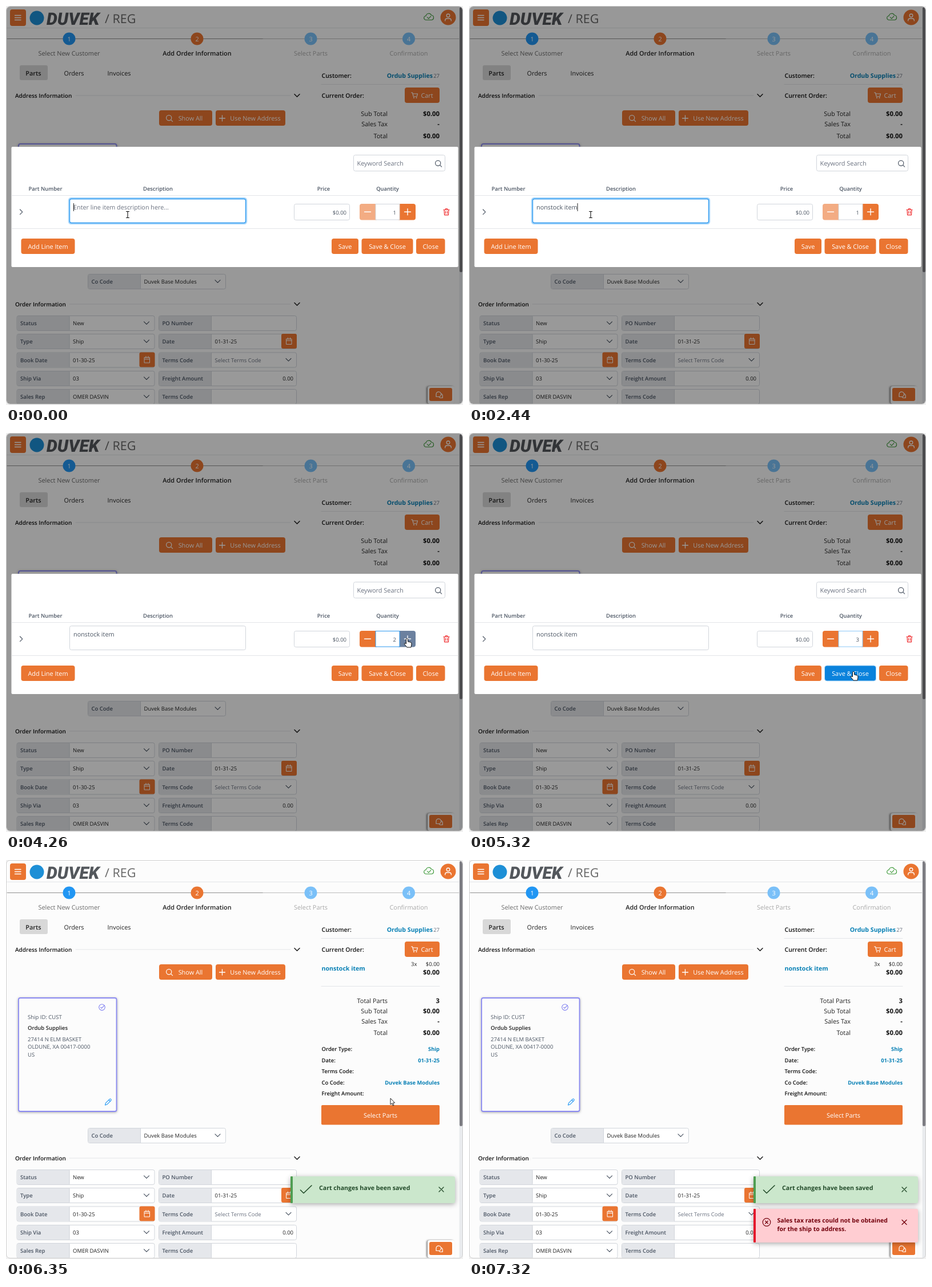
An HTML page for the animation above (8.18 s loop, 800 by 700 pixels).

```html
<!DOCTYPE html>
<html lang="en">
<head>
<meta charset="utf-8">
<title>Order entry</title>
<style>
html, body { margin: 0; width: 100%; height: 100%; overflow: hidden; background: #f1f1f1; }
svg { display: block; width: 800px; height: 700px; }
text { font: 10.9px "Open Sans", sans-serif; fill: #222; white-space: pre; text-rendering: geometricPrecision; }
.s { font-size: 9.5px; }
.b { font-weight: 600; }
.x { font-weight: 700; font-size: 11.3px; fill: #111; }
.m { text-anchor: middle; }
.e { text-anchor: end; }
.w { fill: #fff; }
.k { fill: #111; }
.g { fill: #6b7280; }
.l { fill: #4b5563; }
.n { fill: #6b6b6b; }
.todo { fill: #a9a9a9; }
.link { font-weight: 700; font-size: 10.6px; fill: #0880b5; }
.link.s { font-size: 9.3px; }
.good { font-weight: 700; font-size: 10.6px; fill: #224a29; }
.bad { font-weight: 700; font-size: 10.5px; fill: #73000c; }
.toast { filter: drop-shadow(0 2px 4px #0005); }
.line { fill: none; stroke-linecap: round; stroke-linejoin: round; }
</style>
</head>
<body>
<svg id="stage" viewBox="0 0 800 700"></svg>
<script>
const ORANGE = '#ea7531', SLATE = '#6c819f', BLUE = '#0a82dc', EDGE = '#d1d5db', PAPER = '#fcfcfc';
const LOOP = 8180;

const text = (x, y, str, cls = '', more = '') =>
  `<text x="${x}" y="${y}" class="${cls}" ${more}>${str.replace(/&/g, '&amp;')}</text>`;
const rect = (x, y, w, h, fill, more = '') =>
  `<rect x="${x}" y="${y}" width="${w}" height="${h}" fill="${fill}" ${more}/>`;
const frame = (x, y, w, h, more = '') =>
  rect(x + .5, y + .5, w - 1, h - 1, '#fff', `stroke="${EDGE}" rx="3" ${more}`);
const circle = (x, y, r, fill, more = '') =>
  `<circle cx="${x}" cy="${y}" r="${r}" fill="${fill}" ${more}/>`;
const line = (d, color, width = 1.2, more = '') =>
  `<path class="line" d="${d}" stroke="${color}" stroke-width="${width}" ${more}/>`;
const group = (id, body, more = '') => `<g id="${id}" ${more}>${body}</g>`;
const rule = (x1, x2, y) => line(`M${x1} ${y}H${x2}`, '#e3e5e8', 1);
const down = (x, y, color = '#4b5563', width = 1.2) =>
  line(`M${x - 4.5} ${y - 2.2}l4.5 4.5 4.5-4.5`, color, width);
const lens = (x, y, color) =>
  circle(x - .8, y - .8, 4.6, 'none', `stroke="${color}" stroke-width="1.2"`) +
  line(`M${x + 2.6} ${y + 2.6}l3 3`, color);
const cross = (x, y, color, r = 4) =>
  line(`M${x - r} ${y - r}l${2 * r} ${2 * r}m0 ${-2 * r}l${-2 * r} ${2 * r}`, color, 1.3);
const button = (x, y, w, h, label, { labelX = x + w / 2, id = '', radius = 4 } = {}) =>
  rect(x, y, w, h, ORANGE, `rx="${radius}" ${id && `id="${id}"`}`) +
  text(labelX, y + h / 2 + 4.5, label, 'm w');

const calendar = (x, y) => rect(x, y, 27, 26, ORANGE, 'rx="3"') +
  line(`M${x + 9} ${y + 9}h9v9.5h-9zm0 3h9m-6.5-5v3m4-3v3`, '#fff', 1);

function field(x, y, label, value = '', kind = '', w = 242) {
  const end = x + w;
  let out = frame(x, y, w, 27) +
    rect(x + 1, y + 1, 92, 25, '#e5e7eb', 'rx="2"') +
    line(`M${x + 92.5} ${y + 1}v25`, EDGE, 1) +
    text(x + 6.5, y + 17, label, 's b l');
  out += kind === 'number' ? text(end - 6, y + 17, value, 's e')
                           : text(x + 98.5, y + 17, value, kind === 'hint' ? 's g' : 's');
  if (kind === 'pick' || kind === 'hint') out += down(end - 14.5, y + 13);
  if (kind === 'date') out += calendar(end - 27, y);
  return out;
}

const step = (n, x, label, color, cls) =>
  circle(x, 57.5, 11, color) + text(x, 61.7, String(n), 'm w') + text(x, 87, label, 'm ' + cls);

const section = (label, y, from) =>
  text(16, y, label, 'b k', 'style="font-size:10px"') + rule(from, 498, y - 4) + down(509.5, y - 4, '#222', 1.6);

const header =
  rect(7, 6, 28, 29, ORANGE, 'rx="4"') +
  line('M15.5 16.5h10.5m-10.5 4h10.5m-10.5 4h10.5', '#fff', 1.3) +
  circle(54, 21, 12.5, '#1d8fd6') +
  text(71, 33, 'DUVEK', '', 'style="font:italic 900 30px Roboto,sans-serif;fill:#53575c"') +
  text(173, 30, '/ REG', '', 'style="font-size:21.5px;fill:#666"') +
  line('M736.5 24.5h-1a3.6 3.6 0 0 1-.4-7.2a5 5 0 0 1 9.4-1.3a4.3 4.3 0 0 1 .6 8.5zM737.5 19.8l2.3 2.3 4-4.2', '#3f9a3b') +
  circle(774, 20, 13.5, ORANGE) +
  circle(774, 16.8, 2.8, 'none', 'stroke="#fff" stroke-width="1.3"') +
  line('M768.7 26v-.8q0-3.2 3.2-3.2h4.2q3.2 0 3.2 3.2v.8', '#fff', 1.3) +
  rule(1, 793, 38.5);

const stepper =
  line('M2 57.5H450', '#8f8f8f', 1) +
  line('M450 57.5H793', '#bcbcbc', 1) +
  step(1, 110.5, 'Select New Customer', '#2196f3', 'n') +
  step(2, 334.5, 'Add Order Information', ORANGE, 'b') +
  step(3, 533.5, 'Select Parts', '#7ac0f8', 'todo') +
  step(4, 705, 'Confirmation', '#7ac0f8', 'todo');

const addressCard =
  rect(22, 242, 171.5, 199, PAPER, 'rx="3" stroke="#8b8af2" stroke-width="1.8" style="filter:drop-shadow(0 1px 2px #0005)"') +
  circle(168, 258.3, 5.3, 'none', 'stroke="#7f7ff0" stroke-width="1.1"') +
  line('M165.6 258.4l1.8 1.8 4.5-4.8', '#7f7ff0', 1.1) +
  text(38, 278.5, 'Ship ID: CUST', 's l') +
  text(38, 298, 'Ordub Supplies', 's b') +
  text(38, 317.5, '27414 N ELM BASKET', 's l') +
  text(38, 331, 'OLDUNE, XA 00417-0000', 's l') +
  text(38, 344.5, 'US', 's l') +
  line('M173.5 430l1-3.6 7-7q1.2-.8 2.2.2t.2 2.2l-7 7zM180 421l2.4 2.4', '#2196f3', 1.1);

const workArea =
  rect(24, 104, 49, 26, '#d8d8d8', 'rx="3"') +
  text(48, 121.5, 'Parts', 'b m') + text(119, 121.5, 'Orders', 'm', 'font-weight="500"') +
  text(198, 121.5, 'Invoices', 'm', 'font-weight="500"') +
  section('Address Information', 161, 122) +
  button(268, 183, 93, 27, 'Show All', { labelX: 323 }) + lens(286, 197, '#fff') +
  button(367, 183, 122, 27, 'Use New Address', { labelX: 436.5 }) +
  line('M373.5 197h10m-5-5v10', '#fff', 1.3) +
  addressCard +
  field(143, 470, 'Co Code', 'Duvek Base Modules', 'pick') +
  section('Order Information', 527, 111) +
  field(18.5, 543, 'Status', 'New', 'pick') + field(267, 543, 'PO Number') +
  field(18.5, 575, 'Type', 'Ship', 'pick') + field(267, 575, 'Date', '01-31-25', 'date') +
  field(18.5, 607.5, 'Book Date', '01-30-25', 'date') + field(267, 607.5, 'Terms Code', 'Select Terms Code', 'hint') +
  field(18.5, 640, 'Ship Via', '03', 'pick') + field(267, 640, 'Freight Amount', '0.00', 'number') +
  field(18.5, 672, 'Sales Rep', 'OMER DASVIN', 'pick') + field(267, 672, 'Terms Code');

const totals = rows => rows.map(([label, value, y]) =>
  text(668, y, label, 'e') + text(759, y, value, 'x e')).join('');

const orderHead =
  text(552.5, 125.5, 'Customer:', 'b k', 'style="font-size:10.5px"') +
  text(747, 125.5, 'Ordub Supplies', 'e link') + text(759, 125.5, '27', 's e g') +
  rule(552, 759, 137.5) +
  text(552.5, 161, 'Current Order:', 'b k', 'style="font-size:10.5px"') +
  button(698, 143, 61, 27, 'Cart', { labelX: 737 }) +
  line('M709.5 152h2l1.7 6.8h6l1.3-4.8h-8.3', '#fff', 1.1) +
  circle(714, 161, 1, '#fff') + circle(718.5, 161, 1, '#fff');

const emptyOrder = totals([['Sub Total', '$0.00', 193], ['Sales Tax', '-', 211], ['Total', '$0.00', 232]]);

const details = [['Order Type:', 'Ship'], ['Date:', '01-31-25'], ['Terms Code:', ''],
  ['Co Code:', 'Duvek Base Modules'], ['Freight Amount:', '']];
const filledOrder =
  text(552.5, 194, 'nonstock item', 'link') +
  text(709, 186, '3x', 's') + text(759, 186, '$0.00', 's e') + text(759, 201, '$0.00', 'x e') +
  rule(552, 759, 221.5) +
  totals([['Total Parts', '3', 250.5], ['Sub Total', '$0.00', 269], ['Sales Tax', '-', 287], ['Total', '$0.00', 307]]) +
  details.map(([label, value], i) => text(552.5, 335 + i * 19.5, label, 's b k') +
    text(759, 335 + i * 19.5, value, 's e link')).join('') +
  button(552, 430, 207, 34.5, 'Select Parts', { radius: 2 });

const chat =
  rect(738, 667, 47, 31, '#fff', 'rx="4" style="filter:drop-shadow(-2px 0 1.5px #0007)"') +
  rect(741, 670, 40, 23, ORANGE, 'rx="3"') +
  line('M753 685.5v-4.5a4.3 4.3 0 1 1 4.3 4.5zM762.5 680.5a3.3 3.3 0 0 1 1.7 3v4h-3.5a3.2 3.2 0 0 1-2.7-1.7', '#fff', 1.2);

const scrollbar = rect(793.5, 1, 6, 697, '#e9ebee') + rect(794, 2, 5, 465, '#7c7c82', 'rx="2.5"');

const heading = (x, label) => text(x, 323.5, label, 'b m l', 'style="font-size:9.4px"');
const modal =
  rect(9.5, 247, 782, 211, '#fff', 'rx="2"') +
  frame(608, 261, 161, 29) + text(614.5, 280, 'Keyword Search', 'g') + lens(757, 276.5, '#4b5563') +
  heading(69, 'Part Number') + heading(266, 'Description') + heading(556, 'Price') + heading(668, 'Quantity') +
  rule(10, 791, 332.5) + rule(10, 791, 390.5) +
  line('M24.5 357l4.3 4.3-4.3 4.3', '#4b5563') +
  frame(111, 338, 309, 43) +
  group('focus', rect(110, 337, 311, 45, '#fff', 'rx="4" stroke="#a9d7fb" stroke-width="2.5"') +
    rect(111.5, 338.5, 308, 42, '#fff', 'rx="3" stroke="#2b98ef" stroke-width="1.3"')) +
  text(118, 357, '', '', 'id="desc" style="font-size:10.8px"') +
  rect(0, 346, 1, 14, '#222', 'id="caret"') +
  frame(504, 347, 98, 29) + text(596, 365.5, '$0.00', 's e l') +
  rect(619, 347, 32, 28.5, ORANGE, 'rx="4" id="minus"') +
  rect(685, 347, 32, 28.5, ORANGE, 'rx="4" id="plus"') +
  rect(647, 347.5, 42, 27.5, '#fff', `stroke="${EDGE}" id="qtyBox"`) +
  text(683, 365.5, '1', 's e l', 'id="qty"') +
  line('M627.5 361.3h11m59 0h11m-5.5-5.5v11', '#fff', 1.4) +
  line('M766 357.5h10m-9 0l.6 9.2h6.8l.6-9.2m-5.5 0v-2h3v2m-3 2.5v4m3-4v4', '#ef2b2d') +
  button(26.5, 408, 94, 27, 'Add Line Item') +
  button(570, 408, 47, 27, 'Save') +
  button(622.5, 408, 90, 27, 'Save & Close', { id: 'saveClose' }) +
  button(718, 408, 50.5, 27, 'Close');

const toast = (y, h, fill, bar) =>
  rect(498, y, 288, h, fill, 'rx="3" class="toast"') + rect(498, y, 4, h, bar, 'rx="1"');
const savedToast = toast(555, 47, '#cbe7cc', '#4f9e52') +
  line('M515.5 579l5.5 5.5 14-13.5', '#224a29', 1.6) +
  text(548, 579, 'Cart changes have been saved', 'good') +
  cross(762, 578, '#224a29');
const errorToast = toast(612, 59, '#ffcdd2', '#e4152b') +
  circle(521, 635.5, 6.8, 'none', 'stroke="#73000c" stroke-width="1.2"') + cross(521, 635.5, '#73000c', 2.3) +
  text(539.5, 636, 'Sales tax rates could not be obtained', 'bad') +
  text(539.5, 651, 'for the ship to address.', 'bad') +
  cross(762, 635.5, '#73000c');

const cursorShapes = {
  beam: line('M-2.5-5.5h2l.5.5.5-.5h2M0-5v10M-2.5 5.5h2l.5-.5.5.5h2', '#111', 1.1),
  arrow: '<path d="M0 0V11L2.5 8.8 4.3 13 6 12.2 4.2 8.2 7.6 8Z" fill="#fff" stroke="#222"/>',
  hand: '<path d="M-1.5 1.5Q0-1 1.5 1.5V6L6 7Q8 7.5 8 10L7 16H0L-4.5 10.5Q-5 8-2.5 9L-1.5 10Z" fill="#fff" stroke="#111"/>'
};

document.getElementById('stage').innerHTML =
  '<clipPath id="window"><rect x="1" y="1" width="798" height="697" rx="6"/></clipPath>' +
  group('page', rect(0, 0, 800, 700, PAPER) + header + stepper + workArea + orderHead +
    group('emptyOrder', emptyOrder) + group('filledOrder', filledOrder) + scrollbar +
    group('saved', savedToast) + chat + group('error', errorToast) +
    rect(0, 0, 800, 700, '#000', 'opacity=".4" id="shade"'), 'clip-path="url(#window)"') +
  rect(.5, .5, 799, 698, 'none', 'rx="6.5" stroke="#cfcfcf"') +
  group('modal', modal) +
  group('cursor', Object.entries(cursorShapes).map(([id, shape]) => group(id, shape)).join(''));

const ui = id => document.getElementById(id);
const show = (id, on) => { ui(id).style.display = on ? '' : 'none'; };
const paint = (id, fill) => ui(id).setAttribute('fill', fill);
const place = (id, x, y, opacity = 1) => {
  ui(id).setAttribute('transform', `translate(${x} ${y})`);
  ui(id).setAttribute('opacity', opacity);
};
const within = (t, a, b) => t >= a && t < b;
const current = (table, t) => table.findLast(row => row[0] <= t);

const typing = [[0, ''], [370, 'n'], [510, 'no'], [650, 'non'], [1220, 'nons'], [1350, 'nonsto'],
  [1480, 'nonstoc'], [1610, 'nonstock'], [1890, 'nonstock '], [2170, 'nonstock i'],
  [2310, 'nonstock ite'], [2440, 'nonstock item']];
const pointer = [[0, 213, 366, 'beam'], [3000, 224, 369, 'beam'], [3120, 300, 390, 'arrow'],
  [3240, 440, 424, 'arrow'], [3360, 612, 446, 'arrow'], [3480, 705, 411, 'hand'],
  [3630, 708, 393, 'arrow'], [3750, 705, 372, 'hand'], [3870, 703, 363, 'hand'],
  [3990, 702, 360, 'hand'], [4760, 697, 385, 'arrow'], [4920, 682, 412, 'hand'],
  [5080, 673, 418, 'hand'], [5900, 673, 418, 'arrow'], [6770, 682, 410, 'arrow'],
  [6910, 706, 396, 'arrow'], [7050, 746, 386, 'arrow'], [7180, 786, 384, 'arrow'], [7320, 850, 384, 'arrow']];
const savedMotion = [[0, 0, 0], [5600, 80, .62], [5750, 69, 1], [6350, 0, 1]];
const errorMotion = [[0, 0, 0], [6490, 14, .5], [6630, 0, 1]];

const ruler = document.createElement('canvas').getContext('2d');
ruler.font = '10.8px "Open Sans", sans-serif';

function render(t) {
  const closed = t >= 5600, focused = t < 4110;
  show('shade', !closed);
  show('emptyOrder', !closed);
  show('filledOrder', closed);
  show('modal', t < 5750);
  ui('modal').setAttribute('opacity', closed ? .08 : 1);
  ui('modal').setAttribute('transform', closed ? 'translate(111 95) scale(.725)' : '');

  const typed = current(typing, t)[1];
  ui('desc').textContent = typed || 'Enter line item description here...';
  ui('desc').setAttribute('class', typed ? 'l' : 'g');
  ui('caret').setAttribute('x', 118 + ruler.measureText(typed).width);
  show('caret', focused && !within(t, 3000, 3480) && t < 3990);
  show('focus', focused);

  ui('qty').textContent = t < 4110 ? 1 : t < 4430 ? 2 : 3;
  paint('minus', focused ? '#f3ac83' : ORANGE);
  paint('plus', within(t, 3750, 4760) ? SLATE : ORANGE);
  ui('qtyBox').setAttribute('stroke', focused ? EDGE : t < 5320 ? '#2b98ef' : '#8cc8f7');
  const hovered = within(t, 3480, 3630) || within(t, 4920, 5320);
  paint('saveClose', t >= 5320 ? BLUE : hovered ? SLATE : ORANGE);
  ui('saveClose').setAttribute('stroke', t >= 5320 ? '#b5dbf8' : 'none');

  const [, savedY, savedAlpha] = current(savedMotion, t);
  place('saved', 0, savedY, savedAlpha);
  const [, errorY, errorAlpha] = current(errorMotion, t);
  place('error', 0, errorY, errorAlpha);

  const [, x, y, kind] = current(pointer, t);
  place('cursor', x, y);
  for (const id in cursorShapes) show(id, id === kind);
}

const start = performance.now();
function tick() {
  render((performance.now() - start) % LOOP);
  requestAnimationFrame(tick);
}
tick();
</script>
</body>
</html>
```
